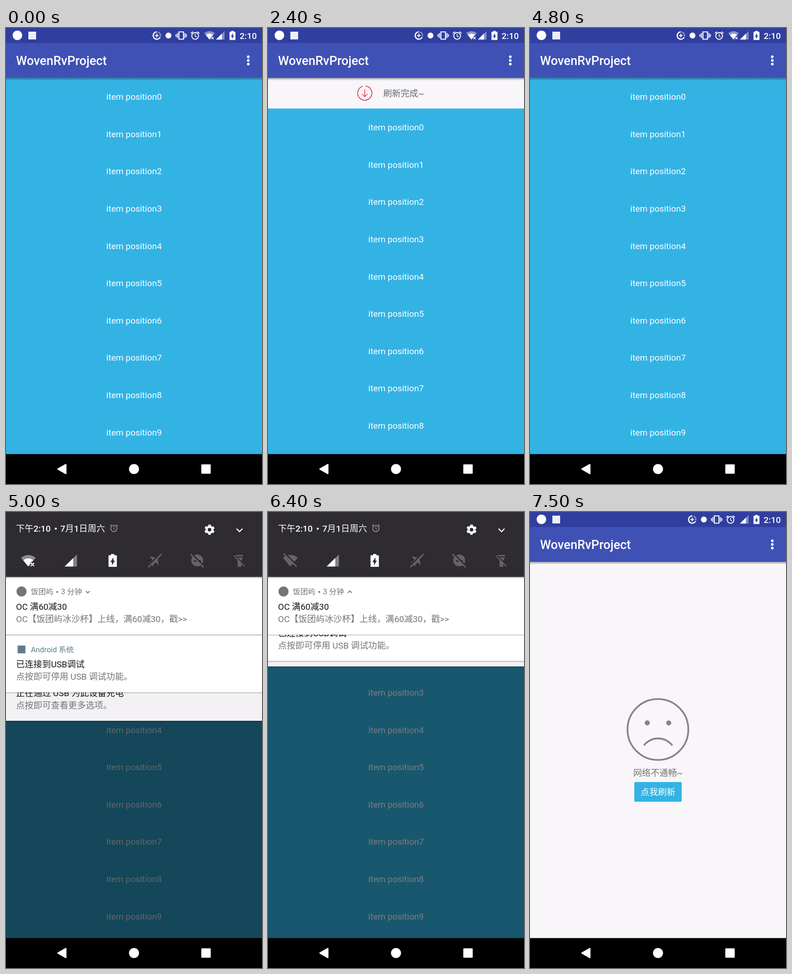
Recreate the animation shown at these times as an HTML page. Size 561 by 998 pixels, loop 8 s.

```html
<!DOCTYPE html>
<html lang="zh">
<head>
<meta charset="utf-8">
<title>Pull to refresh</title>
<style>
  html, body { margin: 0; width: 100%; height: 100%; overflow: hidden; background: #000; }
  svg { display: block; width: 100vw; height: 100vh; }
  text { font: 19.1px Roboto, 'Noto Sans CJK SC', 'Noto Sans CJK', sans-serif; white-space: pre; }
  .mid { text-anchor: middle; }
  .small { font-size: 16.4px; }
  .strong { font-weight: 500; }
  .line { fill: none; stroke: currentColor; }
</style>
</head>
<body>
<svg id="stage" viewBox="0 0 561 998" preserveAspectRatio="none"></svg>
<script>
const LOOP = 8000, STEP = 100, ROW = 81.61, CARD = 126.3, HEADER = 67;
const BAR = 109.2, NAV = 932.5;
const BLUE = '#33b3e4', PAPER = '#f8f6f9', GREY = '#757477';

const rect = (x, y, w, h, fill, more = '') =>
  `<rect x="${x}" y="${y}" width="${w}" height="${h}" fill="${fill}" ${more}/>`;
const dot = (x, y, r, fill, more = '') =>
  `<circle cx="${x}" cy="${y}" r="${r}" fill="${fill}" ${more}/>`;
const line = (d, w, more = '') => `<path class="line" d="${d}" stroke-width="${w}" ${more}/>`;
const shape = (d, more = '') => `<path d="${d}" fill="currentColor" ${more}/>`;
const text = (x, y, s, fill, more = '') => `<text x="${x}" y="${y}" fill="${fill}" ${more}>${s}</text>`;
const strong = s => `<tspan class="strong">${s}</tspan>`;
const group = (inner, more = '') => `<g ${more}>${inner}</g>`;
const at = (x, y, inner, color = '#fff', scale = 1, id = '') =>
  group(inner, `${id && `id="${id}"`} color="${color}" transform="translate(${x} ${y}) scale(${scale})"`);

// Icons are drawn around their own centre.
const fan = 'M0 9 L-11.7 -5 Q0 -13.5 11.7 -5 Z';
const icon = {
  wifi: shape(fan, 'opacity=".45"') + shape('M0 9 L-8.2 -.9 Q0 -7 8.2 -.9 L3.2 2 L3 5.3 Z') +
    line('M4 3.2 l5 5 m0 -5 l-5 5', 1.7),
  signal: shape('M-9.5 9 H9.5 V-9.5 Z', 'opacity=".4"') + shape('M-9.5 9 H3.8 V-4 Z'),
  battery: shape('M-6.5 -8 H-2.6 V-10 H2.6 V-8 H6.5 V10 H-6.5 Z'),
  bolt: fill => `<path d="M1.2 -5 L-3.5 2.5 H-1.2 V7.6 L3.5 .4 H1.2 Z" fill="${fill}"/>`,
  alarm: `<circle class="line" cy=".8" r="7.4" stroke-width="2"/>` +
    line('M0 -3.5 V1.2 L3.4 3.4', 1.6) + line('M-9.3 -4.8 L-4.8 -8.6 M9.3 -4.8 L4.8 -8.6', 2),
  vibrate: line('M-5 -8 H5 V8 H-5 Z', 2.2) + line('M-8.2 -5.5 V5.5 M8.2 -5.5 V5.5 M-11.3 -3 V3 M11.3 -3 V3', 2),
  saver: line('M0 -8 A8 8 0 1 0 7.2 3.6', 2.7) + line('M2 -7.8 A8 8 0 0 1 7.8 2', 2.7, 'opacity=".45"') +
    line('M-4 0 H4 M0 -4 V4', 2),
  gear: `<circle class="line" r="6.4" stroke-width="5"/>` +
    `<circle class="line" r="9.2" stroke-width="4" stroke-dasharray="5.2 4.434" stroke-dashoffset="-2.2"/>`,
  plane: shape('M12 -12 L7 -10 L2 -6 L-11 -9 L-5 -1 L-9 4 L-13 4 L-7 8 L-4 14 L-3 9 L2 4 L9 11 L6 -2 L10 -7 Z'),
  quiet: dot(0, 0, 13, 'currentColor') + line('M-7 1 H8', 3.4, 'style="stroke:#2e2c30"'),
  torch: shape('M-8 -13 H8 V-10 H-8 Z M-8 -7.5 H8 L4 -1 V13 H-4 V-1 Z')
};
const slash = line('M-13 -15.5 L16 13.5', 3.2, 'style="stroke:#2e2c30"') + line('M-15 -14 L14 15', 2.8);
const backslash = group(slash, 'transform="scale(-1 1)"');

const statusBar = () => rect(0, 0, 561, 32.8, '#303f9f') +
  dot(25, 16, 10.5, '#fff') + rect(49, 8, 17, 17, '#eceef7') +
  group(at(330.5, 16.5, icon.saver) + dot(356, 16.5, 6.5, '#fff') +
    at(384, 16.5, icon.vibrate) + at(414.5, 16.5, icon.alarm), 'id="shifting"') +
  at(446, 16.3, icon.wifi, '#fff', 1, 'statusWifi') + at(469.5, 16.3, icon.signal) +
  at(496.3, 16.3, icon.battery + icon.bolt('#303f9f')) +
  text(512, 23.5, '2:10', '#fff', 'class="strong"');

const toolbar = () => rect(0, BAR, 561, 6, 'url(#shade)') + rect(0, 32, 561, BAR - 32, '#3f51b5') +
  text(22, 81, 'WovenRvProject', '#fff', 'class="strong" style="font-size:27.2px"') +
  [63, 71, 79].map(y => dot(531, y, 2.9, '#fff')).join('');

const list = () => rect(0, BAR, 561, 824, BLUE) + Array.from({ length: 10 }, (_, i) =>
  text(280.6, 157.2 + i * ROW, 'item position' + i, '#fff', 'class="mid"')).join('');

const pullHeader = () => at(212, 142.5,
    `<path id="ring" class="line" stroke-width="1.9"/>` +
    group(line('M0 -8 V7.5 M-5.8 2 L0 7.8 L5.8 2', 1.7), 'id="arrow"'), '#e8445c') +
  text(297.3, 149.5, '', '#6b696d', 'id="hint" class="mid"');

const errorPage = () => rect(0, BAR, 561, 824, PAPER) +
  group(`<circle class="line" cx="280.3" cy="476" r="66.7" stroke-width="3.8"/>` +
    dot(257, 461.5, 5.6, 'currentColor') + dot(304, 461.5, 5.6, 'currentColor') +
    line('M249.5 511 Q262 495.5 280.5 495.5 Q299 495.5 312 511', 3.8), 'color="#87858a"') +
  text(280.5, 578, '网络不通畅~', GREY, 'class="mid"') +
  rect(228.5, 591, 104, 43, BLUE, 'rx="2.5"') + text(280.5, 620, '点我刷新', '#fff', 'class="mid"');

const navBar = () => rect(0, NAV, 561, 66, '#000') +
  `<path d="M114 965.2 L131 955.5 V975 Z" fill="#fff" stroke="#fff" stroke-width="3" stroke-linejoin="round"/>` +
  dot(280.5, 965.2, 11, '#fff') + rect(428, 955, 20.6, 20.6, '#fff', 'rx="1.5"');

const card = (id, head, title, body) => group(
  rect(0, CARD, 561, 3, 'url(#shade)') + rect(0, 0, 561, CARD, '#fff', `id="${id}Face"`) +
  head + text(22, 72, title, '#151515') + text(22, 99, body, GREY), `id="${id}"`);
const systemHead = rect(25.5, 24, 17, 17, '#607d8b') + text(54.5, 38.5, 'Android 系统', '#607d8b', 'class="small"');
const shopHead = dot(34, 32, 11, GREY) + text(54.5, 38.3, '饭团屿', GREY, 'class="small"') +
  dot(112.3, 33, 2, GREY) + text(120.5, 38.3, '3 分钟', GREY, 'class="small"') +
  `<path id="chevron" class="line" stroke-width="1.8" style="color:${GREY}"/>`;

const quick = () => rect(0, 142, 561, 4, 'url(#shade)') + rect(0, 0, 561, 142, '#2e2c30') +
  text(22, 42.5, '下午' + strong('2:10'), '#fff') + dot(109, 36.5, 2.3, '#fff') +
  text(119, 42.5, strong('7') + '月' + strong('1') + '日周六', '#fff') +
  at(236.5, 35.5, icon.alarm, '#8f8d91', .92) + at(446, 38.7, icon.gear) +
  at(511.7, 39.5, line('M-6.5 -3 L0 3.5 L6.5 -3', 2.4)) +
  dot(49, 106, 0, '#fff', 'id="ripple"') +
  at(49, 107, icon.wifi, '#fff', 1.37, 'wifiOn') +
  at(49, 105, group(shape(fan), 'transform="translate(0 2) scale(1.4)"') + slash, '#656367', 1, 'wifiOff') +
  at(142, 106.5, icon.signal, '#fff', 1.42) +
  at(233.8, 106, icon.battery + icon.bolt('#2e2c30'), '#fff', 1.4) +
  at(326, 106, icon.plane + backslash, '#656367') +
  at(419, 106, icon.quiet + slash, '#656367') +
  at(511.5, 107, icon.torch + group(slash, 'transform="scale(.8)"'), '#656367');

const stage = document.getElementById('stage');
stage.innerHTML = `<defs>
  <linearGradient id="shade" x2="0" y2="1"><stop stop-opacity=".32"/><stop offset="1" stop-opacity="0"/></linearGradient>
  <clipPath id="screen"><rect width="561" height="933"/></clipPath></defs>` +
  group(rect(0, BAR, 561, 824, PAPER) + group(pullHeader(), 'id="pull"') + group(list(), 'id="list"') +
    group(errorPage(), 'id="error"') + toolbar() + statusBar() +
    rect(0, 0, 561, 933, '#000', 'id="scrim"') +
    group(
      card('third', systemHead, '正在通过 USB 为此设备充电', '点按即可查看更多选项。') +
      card('second', systemHead, '已连接到USB调试', '点按即可停用 USB 调试功能。') +
      card('first', shopHead, 'OC 满60减30', 'OC【饭团屿冰沙杯】上线，满60减30，戳&gt;&gt;') +
      group(quick(), 'id="quick"'), 'id="panel"'), 'clip-path="url(#screen)"') + navBar();

const el = {};
stage.querySelectorAll('[id]').forEach(n => el[n.id] = n);

const show = (node, on) => node.setAttribute('display', on ? 'inline' : 'none');
const moveY = (node, y) => node.setAttribute('transform', `translate(0 ${y})`);

// Linear interpolation through [input, value] points.
function track(x, points) {
  if (x <= points[0][0]) return points[0][1];
  for (let i = 1; i < points.length; i++) {
    const [a, from] = points[i - 1], [b, to] = points[i];
    if (x <= b) return from + (to - from) * (x - a) / (b - a);
  }
  return points[points.length - 1][1];
}

const PULL = [
  [1100, 0], [1200, 42], [1300, 128], [1400, 92], [1500, HEADER], [2400, HEADER], [2500, 22], [2600, 0],
  [2700, 0], [2800, 14], [3000, 104], [3100, 140], [3200, 90], [3300, HEADER], [4300, HEADER], [4400, 22], [4500, 0],
  [6500, 0], [6600, 12], [7000, 128], [7100, 140], [7200, 92], [7300, HEADER]
];
const OPEN = [
  [4800, 0], [4900, 215], [5000, 457], [5100, 497], [5200, 512], [5300, 519], [5400, 521],
  [6200, 521], [6300, 485], [6400, 338], [6500, 0]
];
const DIM = [[0, 0], [338, .513], [457, .605], [521, .64]];
const RELEASED = [[1400, 2400], [3200, 4300], [7200, 7400]];

function drawPull(t) {
  const off = track(t, PULL);
  const busy = RELEASED.some(([a, b]) => t >= a && t < b);
  const done = (t >= 2400 && t < 2700) || (t >= 4300 && t < 4600);
  const armed = off > HEADER + 20 && !busy;
  moveY(el.pull, off - HEADER);
  moveY(el.list, off);
  el.hint.textContent = done ? '刷新完成~' : busy ? '刷新中...' : armed ? '释放刷新' : '下拉刷新';
  el.arrow.setAttribute('transform', armed ? 'rotate(180)' : '');
  const sweep = (busy || done ? 1 : Math.min(1, off / HEADER)) * 5.86;
  const x = 15.6 * Math.sin(sweep + .12), y = -15.6 * Math.cos(sweep + .12);
  el.ring.setAttribute('d', `M1.9 -15.5 A15.6 15.6 0 ${sweep > Math.PI ? 1 : 0} 1 ${x} ${y}`);
}

function drawPanel(t) {
  const h = track(t, OPEN);
  show(el.panel, h > 0);
  el.scrim.setAttribute('opacity', track(h, DIM));
  moveY(el.quick, Math.min(0, h - 200));
  moveY(el.first, Math.min(142, h - 24 - CARD));
  moveY(el.second, Math.min(142 + CARD, h - 12 - CARD));
  moveY(el.third, Math.min(142 + 2 * CARD, h - CARD));
  el.thirdFace.setAttribute('fill', h < 515 ? '#f3f1f4' : '#fff');
  el.chevron.setAttribute('d', t < 5300 ? 'M174.8 31 L179.2 35.2 L183.6 31' : 'M174.8 35 L179.2 30.8 L183.6 35');
  const off = t >= 5800;
  show(el.wifiOn, !off);
  show(el.wifiOff, off);
  const press = track(t, [[5600, 0], [6100, 1]]);
  el.ripple.setAttribute('r', press * 34);
  el.ripple.setAttribute('opacity', .16 * (1 - press));
}

function draw(t) {
  const offline = t >= 5800;
  drawPull(t);
  drawPanel(t);
  show(el.error, t >= 7400);
  show(el.statusWifi, !offline);
  el.shifting.setAttribute('transform', `translate(${offline ? 25 : 0} 0)`);
}

function tick(now) {
  draw(Math.floor(now % LOOP / STEP) * STEP);
  requestAnimationFrame(tick);
}
draw(0);
requestAnimationFrame(tick);
</script>
</body>
</html>
```
